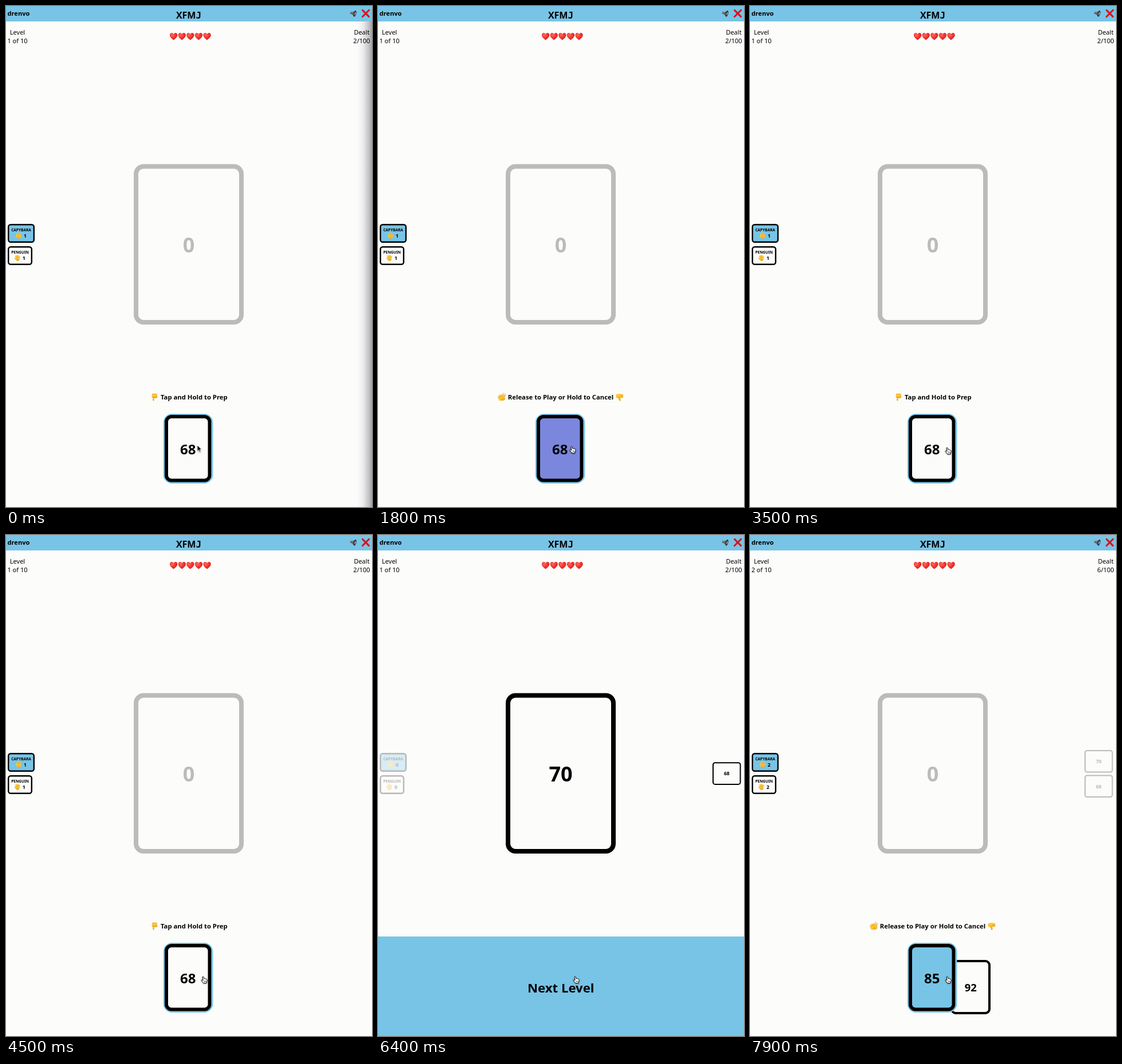
Recreate the animation shown at these times as an HTML page. Size 639 px wide and 876 px high, loop 8000 ms.

```html
<!DOCTYPE html>
<html lang="en">
<head>
<meta charset="utf-8">
<title>Card game</title>
<style>
  html, body { margin: 0; width: 100%; height: 100%; overflow: hidden; background: #fcfcfb; }
  svg { display: block; width: 100%; height: 100%; }
  text { font-family: "Noto Sans", "Open Sans", sans-serif; text-anchor: middle; }
  .b { font-weight: 700; }
</style>
</head>
<body>
<svg id="stage" viewBox="0 0 639 876" xmlns="http://www.w3.org/2000/svg">
  <defs>
    <linearGradient id="edge">
      <stop offset="0" stop-color="#77777f" stop-opacity="0"/>
      <stop offset=".4" stop-color="#77777f" stop-opacity=".12"/>
      <stop offset=".75" stop-color="#77777f" stop-opacity=".4"/>
      <stop offset="1" stop-color="#77777f" stop-opacity=".7"/>
    </linearGradient>
    <linearGradient id="skin" x2="0" y2="1">
      <stop offset="0" stop-color="#ffd23c"/><stop offset="1" stop-color="#f0a52a"/>
    </linearGradient>
    <radialGradient id="red" cx=".35" cy=".3" r=".8">
      <stop offset="0" stop-color="#ff6a5c"/><stop offset=".45" stop-color="#f23a32"/><stop offset="1" stop-color="#c9151c"/>
    </radialGradient>
    <path id="heart" fill="url(#red)" d="M0 6.6C-2.6 4.6-6.7 1.6-6.7-2.2C-6.7-4.6-5.1-6-3.4-6C-1.8-6-.6-5.1 0-3.7C.6-5.1 1.8-6 3.4-6C5.1-6 6.7-4.6 6.7-2.2C6.7 1.6 2.6 4.6 0 6.6Z"/>
    <g id="palm">
      <path fill="none" stroke="#fbc235" stroke-width="1.9" stroke-linecap="round" d="M-2.8 0L-3.4-3.4M-.9-.5L-1.1-4.6M1.1-.5L1.3-4.5M2.8.4L3.5-2.8M-2 3L-4.6 .6"/>
      <path fill="url(#skin)" d="M-3.7-.6H3.7V2Q3.4 5.3 .5 5.3Q-2 5.3-3.3 2.8Z"/>
      <path fill="none" stroke="#c67a16" stroke-width=".45" d="M-1.9-.4V-2.8M.1-.6V-3.2M2.1-.3V-2.6M-1.8 2Q0 1 1.8 1.4"/>
    </g>
    <g id="down">
      <rect x="-4.5" y="-6.3" width="8.6" height="3" rx="1" fill="#efaa2d"/>
      <path fill="url(#skin)" d="M-4.6-4.4Q0-5.6 4.6-4.2L5 .1Q4.9 1.6 3.6 1.6H-.7V5.3Q-.9 6.6-2 6.6Q-3.2 6.6-3.3 5.3V1.2Q-5.2.4-5-1.4Z"/>
      <path fill="none" stroke="#c67a16" stroke-width=".55" d="M-.7 1.6V-1.6M1.2 1.5V-1.5M3.1 1.4V-1.4M-3.3 1.2V-1"/>
    </g>
    <g id="clap">
      <use href="#palm" transform="translate(2 .3) rotate(-12) scale(1.03)"/>
      <use href="#palm" transform="translate(-1 1) rotate(-38) scale(1.12)"/>
      <path stroke="#c58b32" stroke-width=".9" stroke-linecap="round" d="M2.6-5.6L3.1-7M4.6-4.8L5.9-6.2M5.7-3.2L7.1-3.8"/>
    </g>
    <g id="thumb">
      <path fill="url(#skin)" d="M-6.4-5.1Q-1-6.7 4.4-5.5Q6.2-5 5.8-3.3Q6.8-2.3 6.1-1Q6.5.8 4.7 1.2H1Q2.1 4.6 1.4 6.1Q.1 7.4-1 5.9Q-1.4 3.6-3.2 1.5L-6.4.8Z"/>
      <path fill="none" stroke="#c67a16" stroke-width=".55" d="M1.7-3.3H5.8M1.5-1H6.1M1 1.2Q-.2 1.1-.5 0"/>
    </g>
    <g id="arrow">
      <path fill="#000" stroke="#fff" stroke-width=".9" d="M0 0V10.6L2.5 8.3L4.2 12.1L6 11.3L4.3 7.6H7.7Z"/>
    </g>
    <g id="hand">
      <path fill="#fff" stroke="#000" stroke-width=".95" stroke-linejoin="round" d="M-3-5.2C-2.5-6.3-1.3-6.1-.9-5L.2-1.9C.7-2.7 1.7-2.6 2.1-1.8C2.8-2.3 3.5-2 3.9-1.1C4.8-1.3 5.2-.5 5.2.3C5.3 2 4.8 2.9 4.1 4V5.7H-1.1C-1.8 4.2-3.7 2.4-4.7 1.2C-5.4.2-4.3-.7-3.3-.1L-1.9.9Z"/>
      <path stroke="#000" stroke-width=".6" d="M.3 1.4V3.6M1.7 1.4V3.6M3.1 1.4V3.6"/>
    </g>
  </defs>

  <rect width="639" height="876" fill="#fcfcfb"/>
  <rect id="shade" x="613" y="27" width="26" height="849" fill="url(#edge)"/>
  <rect id="nextBg" y="702" width="639" height="174" fill="#78c4e6" display="none"/>
  <g id="fixed"></g>
  <g id="pile">
    <rect x="227" y="280.5" width="184" height="272.5" rx="13" fill="none" stroke-width="8"/>
    <text class="b" x="319" y="431" font-size="36"></text>
  </g>
  <g id="badges"></g>
  <g id="lost"></g>
  <g id="tap"></g>
  <g id="release"></g>
  <g id="spare"></g>
  <g id="card">
    <rect x="276" y="714.3" width="84" height="119.4" rx="14" fill="#fcfcfb" stroke="#78c4e6" stroke-width="2.6"/>
    <rect id="face" x="280" y="718" width="75.5" height="111.5" rx="9" stroke="#000" stroke-width="6"/>
    <text id="value" class="b" x="317.8" y="783.8" font-size="24"></text>
  </g>
  <text id="next" class="b" x="319.3" y="799.7" font-size="22.2">Next Level</text>
  <g id="cursor" style="filter:drop-shadow(0 1px 1px rgba(0,0,0,.35))">
    <use id="arrowUse" href="#arrow"/><use id="handUse" href="#hand"/>
  </g>
</svg>
<script>
(() => {
  const LOOP = 8000;
  const BLUE = [120, 196, 230], PURPLE = [125, 75, 211];
  const PAPER = '#fcfcfb', GREY = '#bbb';
  const rgb = c => `rgb(${c.map(Math.round)})`;
  const el = id => document.getElementById(id);
  const clamp = v => Math.max(0, Math.min(1, v));

  const text = (x, y, size, s, bold = true, extra = '') =>
    `<text x="${x}" y="${y}" font-size="${size}" ${bold ? 'class="b"' : ''} ${extra}>${s}</text>`;
  const use = (name, x, y) => `<use href="#${name}" x="${x}" y="${y}"/>`;
  const box = (x, y, w, h, r, fill, line, width) =>
    `<rect x="${x}" y="${y}" width="${w}" height="${h}" rx="${r}" fill="${fill}" stroke="${line}" stroke-width="${width}"/>`;

  // Header, hearts and labels
  let head = `<rect width="639" height="27" fill="${rgb(BLUE)}"/>`;
  head += text(2.5, 17, 11.1, 'drenvo', true, 'style="text-anchor:start"');
  head += text(319, 22, 16, 'XFM<tspan style="font-family:\'DejaVu Sans Mono\',monospace">J</tspan>');
  head += `<g transform="translate(607 13) rotate(15)">
    <path fill="#5d6266" d="M-6-2H-2.5L2-5.5V5L-2.5 2.2H-6Z"/>
    <ellipse cx="2.2" cy="-.2" rx="2.2" ry="5.5" fill="#2b2e31"/>
    <ellipse cx="2.5" cy="-.2" rx="1" ry="3" fill="#a9adb0"/>
    <path fill="#8d9397" d="M-6-2H-2.5V-.4H-6Z"/></g>`;
  head += '<path d="M622.6 7.4L633.6 18.6M633.8 7.2L622.4 18.8" stroke="#d8131c" stroke-width="3" stroke-linecap="round"/>';
  for (let i = 0; i < 5; i++) head += use('heart', 292.6 + i * 14.6, 53);
  head += text(20, 50, 11, 'Level', false) + text(621, 50, 11, 'Dealt', false);
  head += text(20, 64.8, 11, '', false, 'id="level"') + text(621, 64.8, 11, '', false, 'id="dealt"');
  el('fixed').innerHTML = head;

  const badge = (name, y, w, fill) => {
    const mid = 3 + w / 2;
    return box(4.2, y + 1.2, w - 2.4, 30.6, 4, fill, '#000', 2.4) +
      text(mid, y + 13.3, 6.55, name) + use('palm', mid - 4.4, y + 20.6) +
      text(mid + 6.7, y + 24, 8.8, '', true, 'data-count=""');
  };
  el('badges').innerHTML = badge('CAPYBARA', 381, 47, rgb(BLUE)) + badge('PENGUIN', 420, 43, PAPER);

  el('tap').innerHTML = use('down', 259.5, 684) + text(328.3, 688, 11.3, 'Tap and Hold to Prep');
  el('release').innerHTML = use('clap', 216, 684) +
    text(319, 688, 11.3, 'Release to Play or Hold to Cancel') + use('thumb', 422, 684);
  el('spare').innerHTML = box(352, 745, 66, 91, 7, PAPER, '#000', 4) + text(385.3, 798.3, 18.4, '92');

  const lostCard = (n, y, color) =>
    box(585, y + 1, 47.6, 37.6, 3.5, PAPER, color, 2) +
    text(608.8, y + 23, 8.6, n, true, `fill="${color}"`);
  const LOST = ['', lostCard(68, 397.3, '#000'), lostCard(70, 376, GREY) + lostCard(68, 419.5, GREY)];

  // Moments of play, in ms
  const HOVER = 300, PRESS = 600, CANCEL = 3000, REVEAL = 4800;
  const NEXT_DOWN = 5800, LEVEL_TWO = 6800, PRESS_TWO = 7500;

  // Cursor path: time, x, y
  const PATH = [[0, 334, 768], [300, 334, 770], [500, 335, 775], [1000, 335, 775],
    [2500, 344, 777], [3000, 346, 778], [LOOP + 1, 346, 778]];
  function cursorAt(t) {
    const i = PATH.findIndex(p => p[0] > t), a = PATH[i - 1], b = PATH[i];
    const k = (t - a[0]) / (b[0] - a[0]);
    return [a[1] + (b[1] - a[1]) * k, a[2] + (b[2] - a[2]) * k];
  }

  const show = (id, on) => el(id).setAttribute('display', on ? 'inline' : 'none');
  const put = (node, s) => { if (node.textContent !== s) node.textContent = s; };
  const counts = document.querySelectorAll('[data-count]');
  const [pileBox, pileText] = el('pile').children;
  let lostNow = 0;

  function draw(t) {
    const two = t >= LEVEL_TWO, done = t >= REVEAL && !two;
    const pressAt = t >= PRESS_TWO ? PRESS_TWO : t >= PRESS && t < CANCEL ? PRESS : -1;
    const held = pressAt >= 0;

    const slide = clamp(t / 300);
    el('shade').setAttribute('transform', `translate(${26 * slide * (2 - slide)} 0)`);
    show('shade', slide < 1);

    put(el('level'), two ? '2 of 10' : '1 of 10');
    put(el('dealt'), two ? '6/100' : '2/100');
    counts.forEach(n => put(n, done ? '0' : two ? '2' : '1'));
    el('badges').setAttribute('opacity', done ? .27 : 1);

    const ink = done ? '#000' : GREY;
    pileBox.setAttribute('stroke', ink);
    pileText.setAttribute('fill', ink);
    put(pileText, done ? '70' : '0');

    const lost = two ? 2 : done ? 1 : 0;
    if (lost !== lostNow) el('lost').innerHTML = LOST[lostNow = lost];

    show('tap', !done && !held);
    show('release', held);
    show('spare', two);
    show('card', !done);
    show('next', done);
    show('nextBg', done && t >= NEXT_DOWN);

    // A held card drifts from blue to purple
    const k = clamp((t - pressAt - 500) / 1400);
    el('face').setAttribute('fill', held ? rgb(BLUE.map((v, i) => v + (PURPLE[i] - v) * k)) : PAPER);
    put(el('value'), two ? '85' : '68');

    const [x, y] = cursorAt(t);
    el('cursor').setAttribute('transform', `translate(${x} ${y})`);
    show('arrowUse', t < HOVER);
    show('handUse', t >= HOVER);
  }

  const start = performance.now();
  function tick() {
    draw(Math.max(0, performance.now() - start) % LOOP);
    requestAnimationFrame(tick);
  }
  tick();
})();
</script>
</body>
</html>
```
